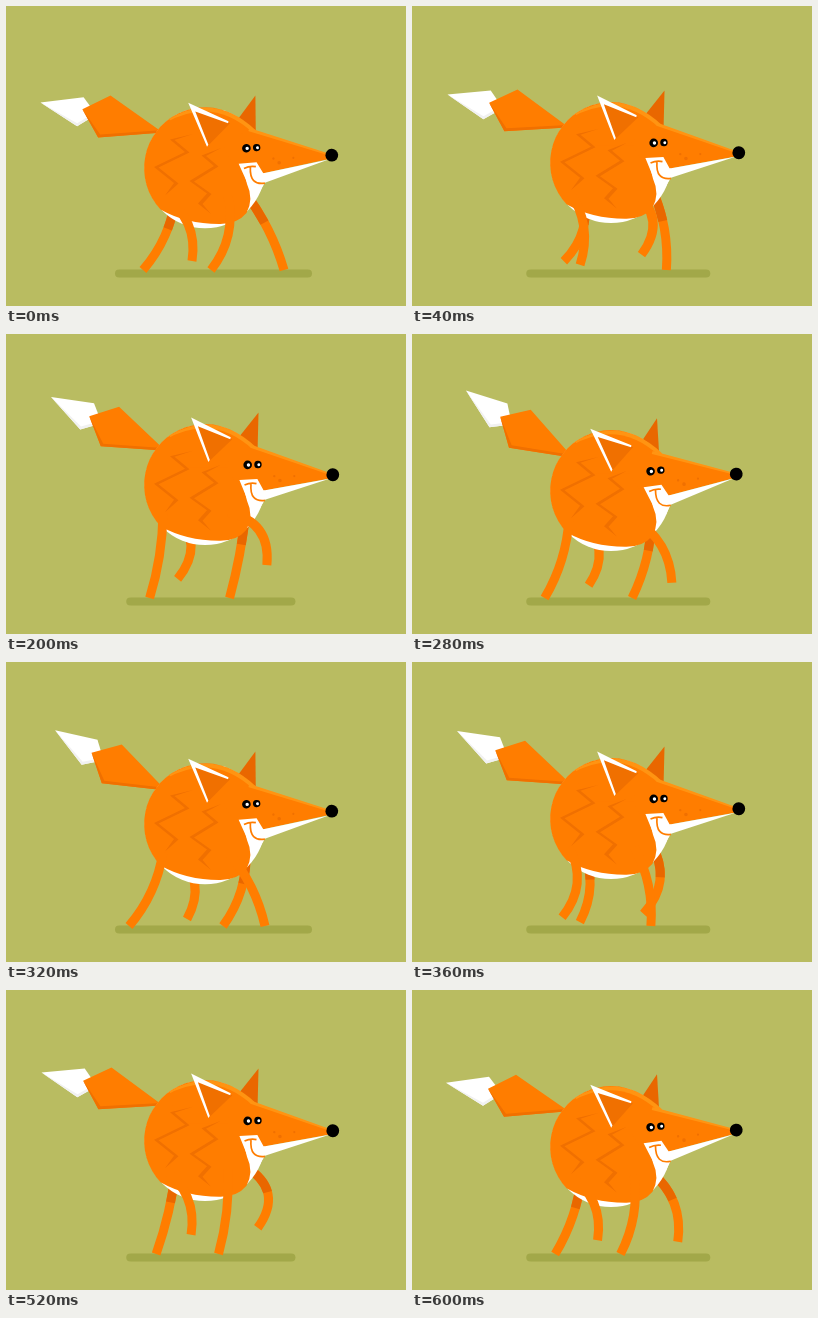
An HTML page with a canvas for the animation above (640 ms loop, 400 by 300 pixels).

```html
<!DOCTYPE html>
<html lang="en">
<head>
<meta charset="utf-8">
<title>Trotting fox</title>
<style>
html, body { margin: 0; width: 100%; height: 100%; overflow: hidden; background: #b9bc61; }
canvas { display: block; }
</style>
</head>
<body>
<canvas id="stage" width="400" height="300"></canvas>
<script>
const ctx = document.getElementById('stage').getContext('2d');
const LOOP = 640, STEP = 40, STRIDE = LOOP / 2, BEAT = STRIDE / 2, GROUND = 264;
const ORANGE = '#ff7d00', SOFT = '#f07000', DARK = '#e96700', LIGHT = '#ff9412';

// Each foot passes four key points, one per beat: x and height above ground.
const farBack = { hip: [170, 190], far: true, keys: [[137, 0], [171, 20], [181, 7], [151, 0]] };
const farFront = { hip: [240, 188], far: true, keys: [[278, 0], [224, 0], [217, 0], [250, 28]] };
const nearBack = { hip: [157, 190], keys: [[186, 9], [145, 0], [123, 0], [185, 20]] };
const nearFront = { hip: [222, 190], keys: [[205, 0], [261, 35], [259, 0], [213, 0]] };

function fill(color, d) {
  ctx.fillStyle = color;
  ctx.fill(new Path2D(d));
}

function poly(color, ...points) {
  fill(color, 'M' + points.join(' ') + 'Z');
}

function disc(color, x, y, r) {
  ctx.fillStyle = color;
  ctx.beginPath();
  ctx.arc(x, y, r, 0, 7);
  ctx.fill();
}

function moved(transform, draw) {
  ctx.save();
  transform();
  draw();
  ctx.restore();
}

function turned(x, y, degrees, draw) {
  moved(() => {
    ctx.translate(x, y);
    ctx.rotate(degrees * Math.PI / 180);
    ctx.translate(-x, -y);
  }, draw);
}

// Slows down towards the top of each hop and speeds up on the way down.
function footAt(keys, t) {
  const i = Math.floor(t / BEAT), u = t % BEAT / BEAT;
  const ease = i % 2 ? u * u : 1 - (1 - u) ** 2;
  const [x, height] = keys[i].map((a, k) => a + (keys[(i + 1) % 4][k] - a) * ease);
  return [x, GROUND - height];
}

// The shorter the reach from hip to foot, the further the knee bulges forward.
function drawLeg({ hip, far, keys }, t, lift) {
  const [fx, fy] = footAt(keys, t);
  const hx = hip[0], hy = hip[1] - lift;
  const dx = fx - hx, dy = fy - hy, reach = Math.hypot(dx, dy);
  const bulge = 1.1 * Math.max(0, 92 - reach) / reach;
  ctx.beginPath();
  ctx.moveTo(hx, hy);
  ctx.quadraticCurveTo((hx + fx) / 2 + dy * bulge, (hy + fy) / 2 - dx * bulge, fx, fy);
  ctx.lineWidth = 9;
  ctx.strokeStyle = ORANGE;
  ctx.stroke();
  if (far) {
    ctx.setLineDash([34, 999]);
    ctx.strokeStyle = DARK;
    ctx.stroke();
    ctx.setLineDash([]);
  }
}

function drawShadow(lift) {
  const left = 109 + lift, right = 306 - 1.47 * lift;
  ctx.fillStyle = '#a2a849';
  ctx.beginPath();
  ctx.roundRect(left, 263.5, right - left, 8, 4);
  ctx.fill();
}

function drawTail(t) {
  const away = Math.abs((t - 280 + LOOP * 1.5) % LOOP - STRIDE);
  const swing = (1 - away / STRIDE) ** 1.6;
  turned(148, 146, 13.9 * swing, () => {
    turned(90.6, 104.7, 11.6 * swing, () => {
      poly('#fff', 34, 98, 77, 92, 90, 109, 71, 121);
      poly('#f1f1f1', 34, 98, 71, 118, 87, 108, 90, 109, 71, 121);
    });
    poly(ORANGE, 76, 104, 104, 90, 153, 124, 175, 141, 150, 127, 92, 132);
    poly(SOFT, 76, 104, 94, 129, 150, 124.5, 175, 141, 150, 127, 92, 132);
  });
}

function drawBody() {
  disc('#fff', 199, 162, 60.3);
  fill(ORANGE, 'M154.500 203.500A60.700 60.700 0 1 1 259 154L236 158L241 178Q248 193 240.500 207Q231 218.500 213 218Q180 218 154.500 203.500Z');
  fill(LIGHT, 'M163 113Q209 86 250 124.500L240 140L190 140Z');
  fill(ORANGE, 'M159 117Q207 90 247 127L240 145L180 145Z');
}

function zigzag(...points) {
  const inner = points.slice(1, -1).map(([x, y]) => [x + 4.5, y + 0.5]);
  poly(SOFT, ...points, ...inner.reverse());
}

function drawStripes() {
  zigzag([187, 128], [164, 133.5], [179, 146], [148, 161], [168, 177], [159, 189.5]);
  zigzag([215, 142], [195.5, 149.5], [208, 160], [183.5, 175], [201, 187.5], [192, 197.5], [205, 208]);
}

function drawHead() {
  fill(LIGHT, 'M247 122L326 153L258 168L235 150Z');
  fill(ORANGE, 'M243 124L325 154.500L324 158L258 168L230 160L220 140Z');
  fill('#fff', 'M234 157L252 156.500L258 168L324 158.300L259 177.500L253 187L245 186Z');

  ctx.strokeStyle = ORANGE;
  ctx.lineWidth = 1.7;
  ctx.stroke(new Path2D('M239 162Q245 159.500 251 161M245.500 161C244 174 249 179 259 178'));

  poly(SOFT, 192, 100, 228, 116, 204, 137.5);
  poly('#fff', 187.5, 93, 226.5, 114, 226, 116, 194, 102, 205, 136, 203.5, 138);

  for (const [x, r] of [[242.7, 4.3], [253, 3.7]]) {
    disc('#000', x, 142, r);
    disc('#fff', x + 0.8, 142.2, 0.4 * r);
  }
  for (const [x, y, r] of [[269, 154, 1.2], [274.5, 158.5, 1.8], [289, 154.5, 1.1]])
    disc(SOFT, x, y, r);
  disc('#000', 327.5, 154.3, 6.4);
}

function drawScene(t) {
  const hop = t % STRIDE / STRIDE;
  const lift = 48 * hop * (1 - hop);
  const lag = (t + STEP) % STRIDE / STRIDE;
  const nod = -6.4 * (2 * lag - 1) ** 2;

  const raised = draw => moved(() => ctx.translate(0, -lift), draw);
  const onHead = draw => turned(245.5, 179, nod, draw);

  ctx.fillStyle = '#b9bc61';
  ctx.fillRect(0, 0, 400, 300);
  drawShadow(lift);
  raised(() => {
    drawTail(t);
    onHead(() => poly(DARK, 255, 90, 234, 115, 240, 135, 253, 128));
  });
  drawLeg(farBack, t, lift);
  drawLeg(farFront, t, lift);
  raised(() => {
    drawBody();
    onHead(drawHead);
  });
  drawLeg(nearBack, t, lift);
  drawLeg(nearFront, t, lift);
  raised(drawStripes);
}

function tick() {
  drawScene(Math.floor(performance.now() / STEP) * STEP % LOOP);
  requestAnimationFrame(tick);
}
tick();
</script>
</body>
</html>
```
